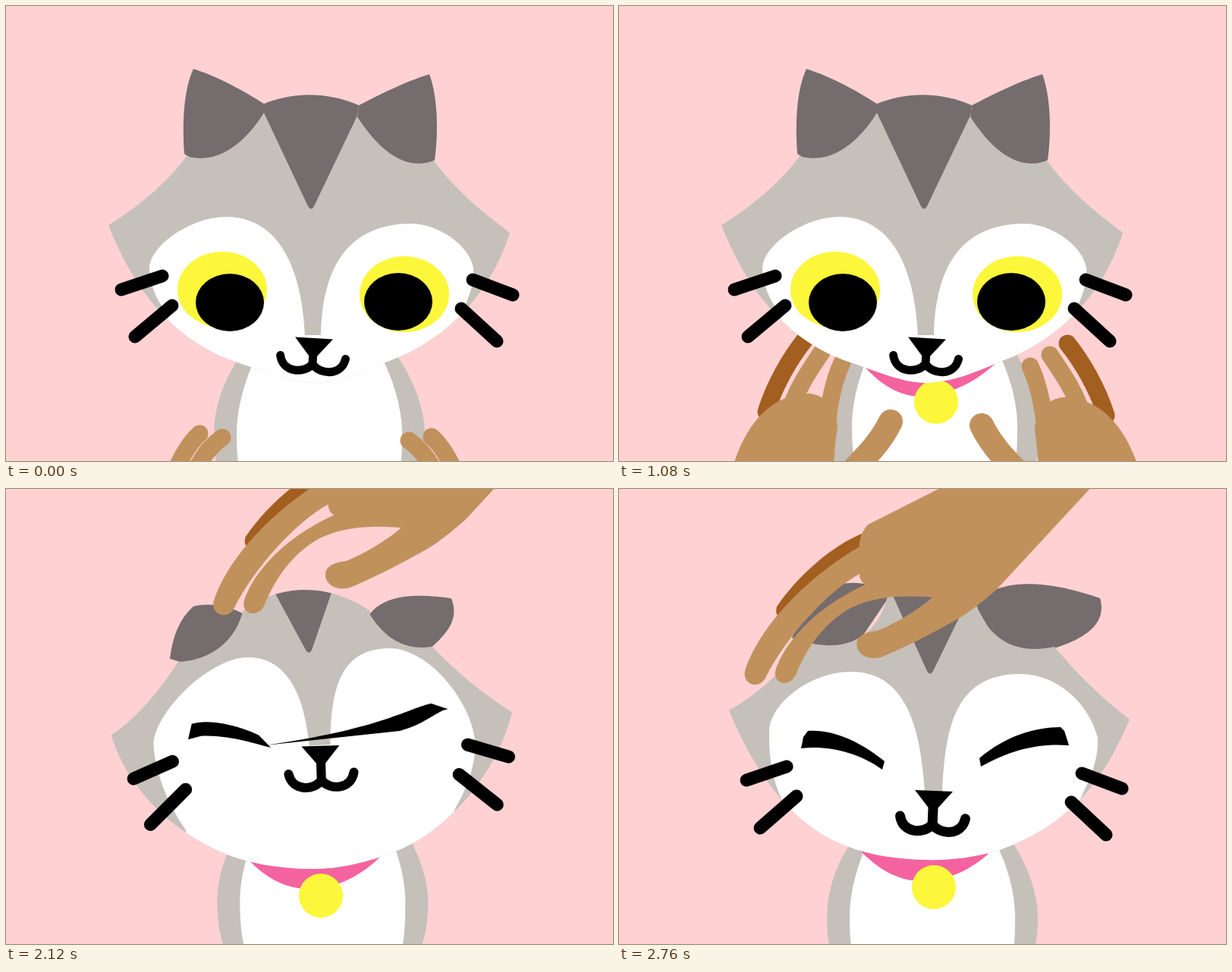
Recreate the animation shown at these times as an HTML page with a canvas. Size 800x600 px, loop 2800 ms.

```html
<!DOCTYPE html>
<html lang="en">
<head>
<meta charset="utf-8">
<title>Cat gets a collar</title>
<style>
html, body { margin: 0; height: 100%; overflow: hidden; background: #ffd1d3; }
canvas { display: block; }
</style>
</head>
<body>
<canvas id="stage" width="800" height="600"></canvas>
<script>
const ctx = document.getElementById('stage').getContext('2d');
const LOOP = 2800, STEP = 40, EYES_SHUT = 2080;
const PINK = '#f562a0', GRAY = '#c5c0ba', DARK = '#756c6d', YELLOW = '#fcf73a',
      SKIN = '#c1915c', SHADE = '#a35f20';

// Blend two strings that differ only in their numbers.
const NUMBER = /-?[\d.]+/g;
function mix(a, b, k) {
  const target = b.match(NUMBER);
  let i = 0;
  return a.replace(NUMBER, v => +v + (target[i++] - v) * k);
}

function sample(times, values, t) {
  const i = times.findIndex(time => time > t);
  if (i === 0) return values[0];
  if (i < 0) return values[values.length - 1];
  const k = (t - times[i - 1]) / (times[i] - times[i - 1]);
  return mix(values[i - 1], values[i], k * k * (3 - 2 * k));
}
const numbers = text => text.match(NUMBER).map(Number);

// Head poses: looking ahead, lifting, looking up, petted low, petted high.
const HEAD_TIMES = [1120, 1520, 1880, 2320, 2760];
const head = {
  skull: [
    'M135 289C175 265 215 230 238 198C280 210 315 180 340 141L340 129C378 113 425 113 465 131L463 146C485 180 520 220 564 204C590 240 625 270 664 299C640 375 585 440 500 470C470 483 435 497 405 497C375 497 340 482 305 470C215 440 165 365 135 289Z',
    'M130 277C165 260 200 222 229 193C255 167 285 143 313 128L313 128C365 98 425 100 482 129L482 129C510 145 535 170 561 196C590 235 625 265 658 289C630 350 575 430 519 449C490 462 445 480 405 480C370 478 335 468 300 459C230 437 155 370 130 277Z',
    'M138 302C175 282 210 240 233 215C250 197 268 177 286 163L286 163C350 107 440 105 518 161L518 161C535 170 553 187 567 202C600 240 635 268 667 291C640 370 580 440 510 468C470 485 430 488 400 488C365 488 330 483 302 472C230 440 155 380 138 302Z',
    'M139 341C165 325 205 275 222 238C265 250 322 235 331 164L331 160C360 143 405 132 450 160L450 168C470 215 505 235 558 212C590 245 630 275 667 297C650 385 580 460 519 484C485 498 445 511 410 511C375 511 340 507 310 499C220 475 165 410 139 341Z',
    'M145 292C175 275 215 245 243 200C285 215 335 205 352 148L354 143C375 130 440 130 470 146L470 150C485 195 520 220 574 208C600 240 635 275 673 304C640 380 600 440 502 476C470 486 435 490 403 489C370 488 335 484 303 472C225 445 175 365 145 292Z'],
  face: [
    'M394 434C392 390 380 278 290 278C245 278 189 315 189 347C190 370 200 390 210 402L250 520L560 520L607 390C613 375 617 365 616 345C610 315 570 287 533 287C450 288 417 345 415 434Z',
    'M383 280C380 240 378 158 322 158C265 160 183 230 184 302C188 350 205 390 233 426L250 520L560 520L589 398C600 365 608 330 608 295C608 235 540 164 475 164C425 165 412 230 410 280Z',
    'M389 234C387 210 375 155 338 155C290 155 194 265 194 310C194 345 215 400 248 444L250 520L560 520L577 424C595 390 607 350 604 310C600 260 530 155 475 155C445 155 428 195 427 233Z',
    'M408 418C403 370 390 273 305 273C250 273 195 320 195 358C197 390 210 425 228 453L250 530L560 530L603 420C620 395 629 370 629 350C625 300 580 252 528 252C440 253 428 310 428 416Z',
    'M403 398C398 330 385 241 306 241C250 241 198 285 198 320C197 350 202 385 215 410L250 520L560 520L612 400C625 375 632 350 631 328C620 285 580 244 528 244C440 244 430 320 426 400Z'],
  leftEar: [
    'M235 195C232 155 234 110 247 83C280 93 315 113 340 129L340 141L290 230Z',
    'M228 192C226 155 228 120 240 95C265 102 290 115 313 128L313 140L280 200Z',
    'M233 213C232 185 235 165 243 148C258 153 273 157 286 164L290 180L270 220Z',
    'M203 232C210 200 225 175 250 160C280 145 315 155 331 164L331 168L280 260Z',
    'M228 196C238 175 250 150 270 135C295 117 335 122 355 140L352 148L290 240Z'],
  rightEar: [
    'M565 203C570 165 569 120 558 90C525 100 490 118 465 131L463 146L510 240Z',
    'M561 195C563 160 562 125 551 100C530 107 505 118 482 129L482 140L510 200Z',
    'M567 202C566 180 563 165 554 146C540 152 528 158 518 161L515 175L535 210Z',
    'M558 212C590 200 625 178 612 143C540 125 475 126 450 168L450 172L500 250Z',
    'M574 210C605 200 645 182 634 144C560 118 500 118 470 150L470 154L520 240Z'],
  // left x, tip x, tip y, right x
  stripe: ['316 402 264 489', '363 396 164 434', '371 399 148 424', '297 399 261 461', '338 410 240 487'],
  // x, y, radii of the irises, then of the pupils
  eyes: [
    '285 374 59 50 525 380 59 50 295 391 45 38 517 390 45 38',
    '279 261 59 62 519 266 59 62 289 261 45 46 510 266 45 46',
    '287 257 59 52 527 251 59 52 297 256 45 39 517 251 45 39',
    '295 375 59 50 530 345 59 50 297 375 45 38 525 345 45 38',
    '295 345 59 50 530 345 59 50 297 345 45 38 525 345 45 38'],
  lids: [
    ...Array(3).fill('M240 265L247 240C280 237 320 250 350 271L348 282C315 260 270 257 240 265ZM475 283C510 250 545 235 580 234L589 254C550 253 510 270 478 294Z'),
    'M240 380L243 363L248 355C280 352 320 365 350 386L348 397C315 375 270 372 240 380ZM475 368C510 335 545 320 578 318L583 321L590 339C550 338 510 355 478 379Z',
    'M240 342L243 327L249 319C285 317 320 335 350 359L347 370C315 347 275 338 240 342ZM475 355C510 325 550 314 582 314L587 319L593 338C550 335 515 345 477 366Z'],
  whiskers: [
    'M152 374L206 356M170 436L219 395M615 361L668 381M600 399L647 442',
    'M153 335L207 318M171 398L220 356M595 325L648 345M580 363L628 407',
    'M163 319L215 298M183 380L231 336M605 289L658 306M592 327L641 369',
    'M172 430L223 406M196 490L241 442M611 374L666 389M601 414L652 452',
    'M168 384L221 366M186 447L234 405M610 375L663 395M596 413L642 456'],
  // x, y, tilt, mouth distance, line width
  muzzle: ['406 438 3.4 25 11', '398 280 3 35 11', '407 236 0 36 11', '420 417 -3 36 13', '415 398 2.5 35 13']
};

const COLLAR_TIMES = [360, 600, 720, 1080, 1120, 1520, 1880, 2320, 2760];
const collarOn = 'M310 470C345 508 375 517 400 517C440 515 470 500 501 470Z|415 527';
const collarWorn = 'M323 475C350 505 375 515 400 515C440 512 470 495 498 470Z|418 522';
const collar = [
  'M310 450C345 460 375 460 400 460C440 460 470 460 501 450Z|415 455',
  collarOn, collarOn, collarWorn, collarWorn,
  'M300 459C340 495 365 517 395 518C445 516 485 485 519 449Z|415 527',
  'M303 472C340 515 365 525 395 525C440 522 480 500 508 468Z|415 534',
  'M336 506C360 525 385 530 415 530C440 527 465 512 482 498Z|415 538',
  'M316 475C345 505 370 517 400 517C440 515 465 500 487 481Z|415 525'];

const BODY_TIMES = [0, 720, 1080, 1520, 1880, 2320, 2760];
const body = ['0 0', '2 -5', '3 -10', '5 -15', '6 -20', '3 -20', '0 0'];

// Little finger, two fingers, palm, thumb; the right hand is the mirror image.
const open = '|M212 435C195 465 185 500 186 550|M236 440C228 465 221 490 219 520|M260 450C259 470 260 490 261 520|M166 605C168 555 190 505 232 503C262 500 270 512 275 528C285 540 290 565 290 605Z|M347 505C338 540 320 580 295 612';
const turned = '|M245 440C225 465 205 500 194 535|M268 455C255 475 240 495 228 525|M294 470C285 490 277 520 274 555|M151 605C165 560 195 512 250 511C275 513 288 535 288 555C285 575 284 590 283 605Z|M358 548C345 575 325 595 300 620';
const low = '|M213 546C202 570 195 590 188 620|M279 479C250 505 233 560 222 620|M309 484C270 512 258 560 262 620|M151 705C165 660 195 612 250 611C275 613 288 635 288 655C285 675 284 690 283 705Z|M358 670C345 690 325 705 300 720';
const HAND_TIMES = [0, 640, 720, 1080, 1120, 1520, 1720];
// dx, dy, mirror sum, extra drop of the right hand
const hands = ['-24 85 816 4' + low, '0 0 836 0' + open, '0 0 836 0' + open, '0 0 836 5' + turned,
  '0 0 836 5' + turned, '0 0 872 11' + low, '-10 160 880 11' + low];

const ARM_TIMES = [1920, 2240, 2320, 2540, 2760];
const arm = ['340 -290', '0 0', '0 0', '62 -4', '0 0'];

function fill(path, color) {
  ctx.fillStyle = color;
  ctx.fill(new Path2D(path));
}
function line(path, color, width) {
  ctx.strokeStyle = color;
  ctx.lineWidth = width;
  ctx.stroke(new Path2D(path));
}
function oval(x, y, rx, ry, color) {
  ctx.fillStyle = color;
  ctx.beginPath();
  ctx.ellipse(x, y, rx, ry, 0, 0, 7);
  ctx.fill();
}
function group(draw) {
  ctx.save();
  draw();
  ctx.restore();
}

function drawBody(t) {
  group(() => {
    ctx.translate(...numbers(sample(BODY_TIMES, body, t)));
    fill('M340 430C300 460 274 515 274 565C274 590 278 612 285 630H541C548 612 552 590 552 565C552 520 525 465 490 430Z', GRAY);
    fill('M345 430C321 475 304 520 304 565C304 590 306 610 311 630H517C521 610 522 590 522 565C522 530 510 480 475 430Z', '#fff');
  });
}

function drawCollar(t) {
  const [band, bell] = sample(COLLAR_TIMES, collar, t).split('|');
  fill(band, PINK);
  oval(...numbers(bell), 29, 29, YELLOW);
}

function drawHands(t) {
  const [place, little, ring, index, palm, thumb] = sample(HAND_TIMES, hands, t).split('|');
  const [dx, dy, mirror, drop] = numbers(place);
  for (const right of [false, true]) group(() => {
    if (right) {
      ctx.translate(mirror, drop);
      ctx.scale(-1, 1);
    }
    ctx.translate(dx, dy);
    line(little, SHADE, 23);
    line(ring, SKIN, 23);
    line(index, SKIN, 23);
    fill(palm, SKIN);
    line(thumb, SKIN, 32);
  });
}

function drawEyes(pose, t) {
  if (t >= EYES_SHUT) return fill(pose.lids, '#000');
  const e = numbers(pose.eyes);
  const lid = 1 - 0.75 * Math.max(0, 1 - (EYES_SHUT - t) / 100);
  for (let i = 0; i < 16; i += 4)
    oval(e[i], e[i + 1], e[i + 2], e[i + 3] * lid, i < 8 ? YELLOW : '#000');
}

function drawMuzzle(pose) {
  const [x, y, tilt, m, width] = numbers(pose.muzzle);
  group(() => {
    ctx.translate(x, y);
    ctx.rotate(tilt * Math.PI / 180);
    fill('M-25 0H25L5 24H-5Z', '#000');
    line(`M0 18V${m + 9}M-43 ${m}C-39 ${m + 23} -10 ${m + 23} 0 ${m + 9}C10 ${m + 23} 39 ${m + 23} 43 ${m}`, '#000', width);
  });
}

function drawHead(t) {
  const pose = {};
  for (const part in head) pose[part] = sample(HEAD_TIMES, head[part], t);
  fill(pose.leftEar, DARK);
  fill(pose.rightEar, DARK);
  fill(pose.skull, GRAY);
  const [left, tipX, tipY, right] = numbers(pose.stripe);
  group(() => {
    ctx.clip(new Path2D(pose.skull));
    fill(`M${left} 90L${tipX - 4} ${tipY}Q${tipX} ${tipY + 7} ${tipX + 4} ${tipY}L${right} 90Z`, DARK);
    fill(pose.face, '#fff');
  });
  drawEyes(pose, t);
  drawMuzzle(pose);
  line(pose.whiskers, '#000', 17);
}

function drawArm(t) {
  if (t < ARM_TIMES[0]) return;
  group(() => {
    ctx.translate(...numbers(sample(ARM_TIMES, arm, t)));
    fill('M322 58C280 75 235 115 208 155Q205 165 212 170L320 90Z', SHADE);
    fill('M759 -150L500 130C490 140 460 165 440 175C400 197 370 212 345 222C325 227 310 215 314 200C318 190 335 187 340 187C370 175 400 155 413 143C380 140 335 140 300 160C265 182 245 215 233 245C225 262 203 258 206 240C215 210 250 160 325 126C320 124 317 118 317 112C275 135 220 195 193 249C185 265 162 258 166 240C185 180 250 115 317 76C316 70 320 55 328 47L421 0L620 -100Z', SKIN);
  });
}

function frame(now) {
  const t = Math.floor(now % LOOP / STEP) * STEP;
  ctx.fillStyle = '#ffd1d3';
  ctx.fillRect(0, 0, 800, 600);
  ctx.lineCap = ctx.lineJoin = 'round';
  drawBody(t);
  drawCollar(t);
  drawHands(t);
  drawHead(t);
  drawArm(t);
  requestAnimationFrame(frame);
}
requestAnimationFrame(frame);
</script>
</body>
</html>
```
